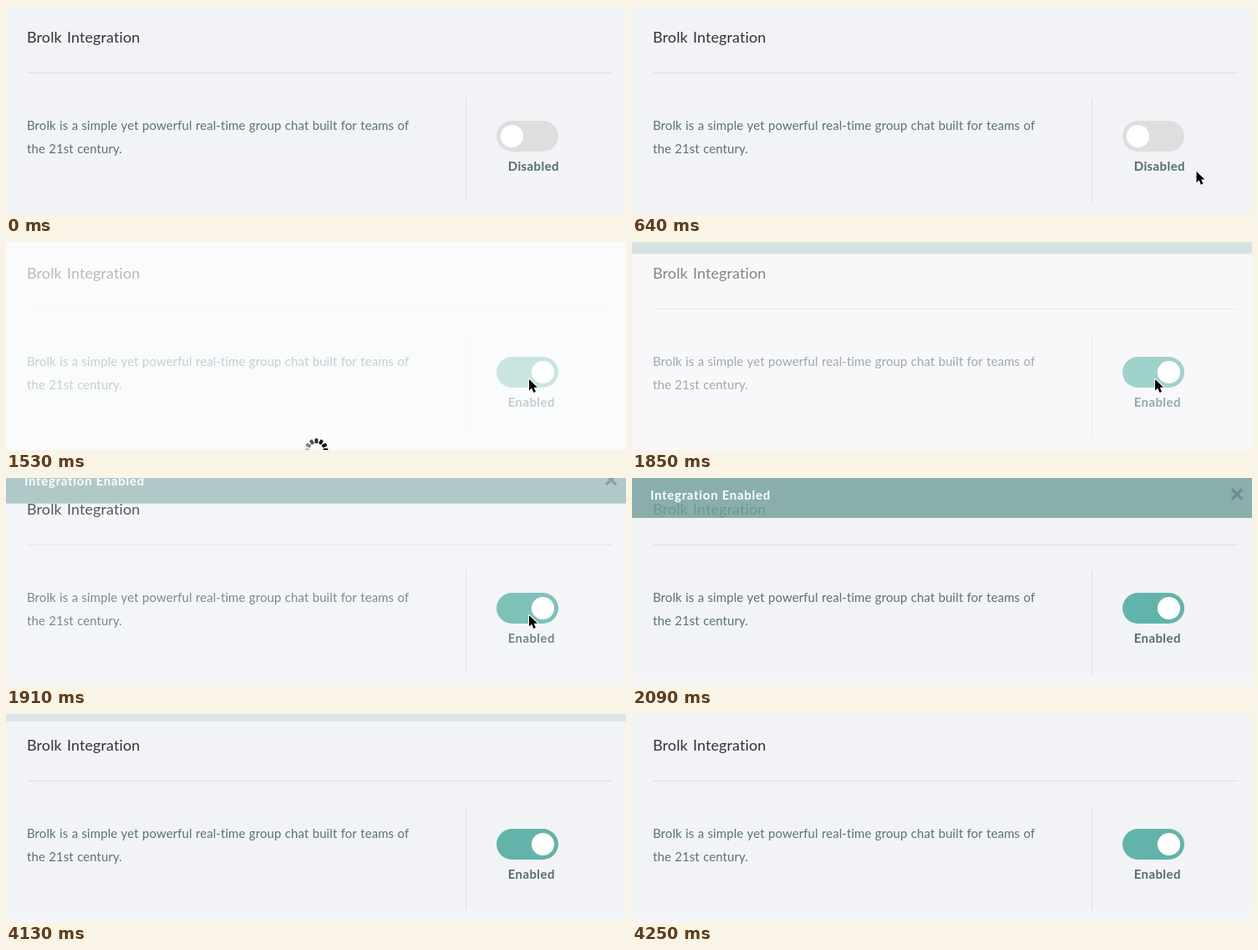
Recreate the animation shown at these times as an HTML page with a canvas. Size 742 px wide and 250 px high, loop 7360 ms.

```html
<!DOCTYPE html>
<html lang="en">
<head>
<meta charset="utf-8">
<title>Integration toggle</title>
<style>
html, body { margin: 0; width: 100%; height: 100%; overflow: hidden; background: #f2f3f7; }
canvas { display: block; width: 742px; height: 250px; }
</style>
</head>
<body>
<canvas id="stage"></canvas>
<script>
const W = 742, H = 250, LOOP = 7360;
const canvas = document.getElementById('stage');
const ctx = canvas.getContext('2d');
const dpr = window.devicePixelRatio || 1;
canvas.width = W * dpr;
canvas.height = H * dpr;

const FAMILY = 'Lato, "Open Sans", sans-serif';
const ARROW = new Path2D('M0 0V13.5L3.2 10.6L5.4 16L8 15L5.7 9.8H10Z');
const HAND = new Path2D('M4 2.4Q4.4.8 6 1.5L8 6Q9.1 4.8 10.3 6Q11.5 5.2 12.5 6.5' +
  'Q14.5 6 15 8L14.8 12L13.5 17H6.5L5 14.5L1.6 10.5Q1.5 8.5 4 9L5.8 10Z');
const FINGERS = new Path2D('M8 6L8.7 9M10.3 6.2L10.8 9M12.5 6.6L12.8 9' +
  'M8.2 11.5V14.5M10.2 11.5V14.5M12.2 11.5V14.5');

const clamp = x => Math.min(1, Math.max(0, x));
const mix = (a, b, p) => a + (b - a) * p;
const swing = x => 0.5 - Math.cos(clamp(x) * Math.PI) / 2;
const during = (t, start, length) => swing((t - start) / length);

// Holds time in even steps while something moves.
function stepped(t, start, end, count) {
  if (t < start || t >= end) return t;
  const size = (end - start) / (count - 1);
  return start + Math.floor((t - start) / size + 1e-6) * size;
}

function text(str, x, y, size, color, { weight = 400, letter = 0, word = 0 } = {}) {
  ctx.font = `${weight} ${size}px ${FAMILY}`;
  ctx.letterSpacing = letter + 'px';
  ctx.wordSpacing = word + 'px';
  ctx.fillStyle = color;
  ctx.fillText(str, x, y);
}

function rect(x, y, w, h, color) {
  ctx.fillStyle = color;
  ctx.fillRect(x, y, w, h);
}

function drawToggle(t) {
  const p = during(t, 1320, 150);
  const off = mix(222, 217, clamp((t - 850) / 90));
  const channel = on => Math.round(mix(off, on, p));
  ctx.fillStyle = `rgb(${channel(98)},${channel(180)},${channel(170)})`;
  ctx.beginPath();
  ctx.roundRect(587, 138, 74, 37, 18.5);
  ctx.fill();
  ctx.fillStyle = '#fff';
  ctx.beginPath();
  ctx.arc(mix(605.5, 642.5, p), 156.5, 13.6, 0, Math.PI * 2);
  ctx.fill();
  text(t < 1320 ? 'Disabled' : 'Enabled', 600.7, 197.5, 15, '#546c71', { weight: 700, letter: 0.4 });
}

function drawPage(t) {
  rect(0, 0, W, H, '#f2f3f7');
  if (t >= 2030) rect(0, 236, W, 14, '#f4f5f8');
  text('Brolk Integration', 25, 44, 18, '#333335', { letter: 0.1, word: 1.5 });
  rect(25, 80, 700, 1, '#dcdfe2');
  const body = { letter: 0.08, word: 0.4 };
  text('Brolk is a simple yet powerful real-time group chat built for teams of', 25, 149, 15, '#5a7277', body);
  text('the 21st century.', 25, 177, 15, '#5a7277', body);
  rect(550, 111, 1, 125, '#dbdfe3');
  drawToggle(t);
}

function drawSpinner(t) {
  const head = Math.round((t - 1530) / 1000 * 12);
  ctx.save();
  ctx.translate(371.5, 250);
  for (let i = 0; i < 12; i++) {
    const age = (((head - i) % 12) + 12) % 12;
    ctx.save();
    ctx.rotate(i * Math.PI / 6);
    ctx.globalAlpha = Math.max(0.25, 1 - (age / 7) ** 2);
    ctx.fillStyle = '#000';
    ctx.beginPath();
    ctx.roundRect(8, -2, 6, 4, 1.5);
    ctx.fill();
    ctx.restore();
  }
  ctx.restore();
}

function drawOverlay(t) {
  if (t < 1320 || t >= 2090) return;
  const alpha = 0.84 * during(t, 1320, 280) * (1 - during(t, 1650, 360));
  rect(0, 0, W, H, `rgba(255,255,255,${alpha})`);
  if (t >= 1380 && t < 1700) drawSpinner(t);
}

function drawBanner(t) {
  const p = during(t, 1730, 290) * (1 - during(t, 3830, 420));
  if (p <= 0) return;
  ctx.save();
  ctx.globalAlpha = p;
  ctx.translate(0, -48 * (1 - p));
  rect(0, 0, W, 48, 'rgba(122,165,160,0.87)');
  ctx.strokeStyle = t < 3830 ? '#6f8d89' : '#859c99';
  ctx.lineWidth = 3.4;
  ctx.beginPath();
  ctx.moveTo(718, 13.5);
  ctx.lineTo(730, 25.5);
  ctx.moveTo(730, 13.5);
  ctx.lineTo(718, 25.5);
  ctx.stroke();
  // The label stays bright while the bar is still pale.
  ctx.globalAlpha = clamp(p * 1.5);
  text('Integration Enabled', 22, 26, 15, '#fff', { weight: 700, letter: 0.7 });
  ctx.restore();
}

function drawCursor(t) {
  if (t < 500 || t >= 2090) return;
  const p = Math.sin(clamp((t - 500) / 440) * Math.PI / 2);
  const curve = (a, b, c) => (1 - p) ** 2 * a + 2 * p * (1 - p) * b + p * p * c;
  const x = curve(716, 668, 626), y = curve(238, 186, 165);
  const pointing = x < 650 && y < 175 && t < 1380;
  ctx.save();
  ctx.translate(x, y);
  ctx.lineJoin = 'round';
  if (pointing) {
    ctx.translate(-5.5, 0);
    ctx.fillStyle = '#fff';
    ctx.strokeStyle = '#000';
    ctx.lineWidth = 1.1;
    ctx.fill(HAND);
    ctx.stroke(HAND);
    ctx.lineWidth = 0.8;
    ctx.stroke(FINGERS);
  } else {
    ctx.strokeStyle = '#fff';
    ctx.lineWidth = 2;
    ctx.stroke(ARROW);
    ctx.fillStyle = '#000';
    ctx.fill(ARROW);
  }
  ctx.restore();
}

function draw(now) {
  let t = now % LOOP;
  t = stepped(t, 500, 940, 15);
  t = stepped(t, 1320, 2030, 12);
  t = stepped(t, 3830, 4250, 8);
  ctx.setTransform(dpr, 0, 0, dpr, 0, 0);
  drawPage(t);
  drawOverlay(t);
  drawBanner(t);
  drawCursor(t);
}

const begin = performance.now();
function tick() {
  draw(performance.now() - begin);
  requestAnimationFrame(tick);
}
tick();
</script>
</body>
</html>
```
